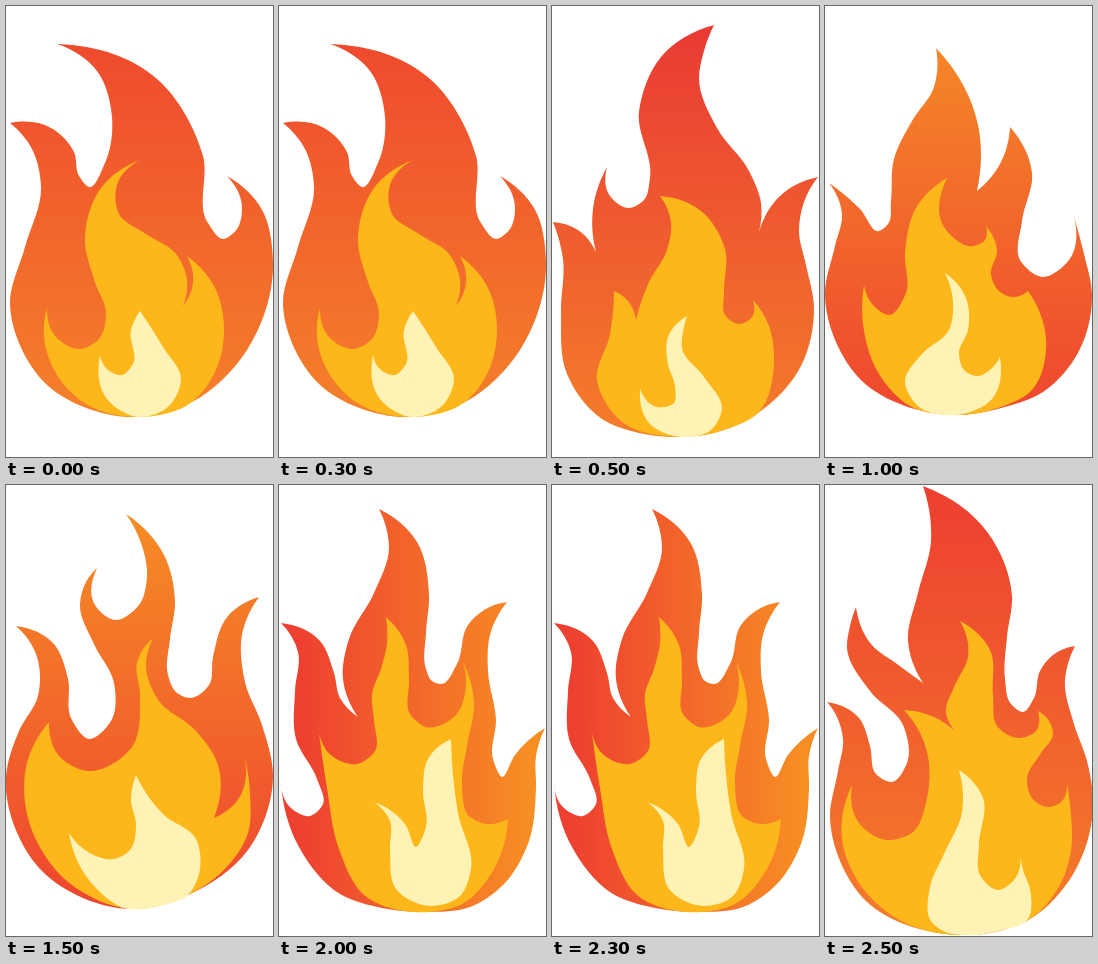
An HTML page for the animation above (3 s loop, 267 px wide and 451 px high).

```html
<!DOCTYPE html>
<html lang="en">
<head>
<meta charset="utf-8">
<title>Flame</title>
<style>
  html, body { margin: 0; width: 100%; height: 100%; overflow: hidden; background: #fff; }
  svg { display: block; width: 100%; height: 100%; }
</style>
</head>
<body>
<svg id="stage" viewBox="0 0 267 451"></svg>
<script>
const STEP = 500;
const stage = document.getElementById('stage');
const flames = [];

function add(parent, tag, attrs) {
  const el = document.createElementNS('http://www.w3.org/2000/svg', tag);
  for (const key in attrs) el.setAttribute(key, attrs[key]);
  return parent.appendChild(el);
}

// Smooth curve through points, with parabolic tangents at each one.
function curve(pts) {
  const last = pts.length - 1;
  const h = [], slope = [], tan = [];
  for (let i = 0; i < last; i++) {
    const dx = pts[i + 1][0] - pts[i][0], dy = pts[i + 1][1] - pts[i][1];
    h[i] = Math.hypot(dx, dy);
    slope[i] = [dx / h[i], dy / h[i]];
  }
  for (let i = 1; i < last; i++) {
    tan[i] = [0, 1].map(k =>
      (h[i] * slope[i - 1][k] + h[i - 1] * slope[i][k]) / (h[i - 1] + h[i]));
  }
  tan[0] = [0, 1].map(k => 2 * slope[0][k] - tan[1][k]);
  tan[last] = [0, 1].map(k => 2 * slope[last - 1][k] - tan[last - 1][k]);
  let d = '';
  for (let i = 0; i < last; i++) {
    const a = pts[i].map((v, k) => v + tan[i][k] * h[i] / 3);
    const b = pts[i + 1].map((v, k) => v - tan[i + 1][k] * h[i] / 3);
    d += `C${a} ${b} ${pts[i + 1]}`;
  }
  return d;
}

// Slashes split an outline into smooth runs; each run starts at a sharp tip.
function outline(text) {
  const runs = text.split('/').map(run =>
    run.trim().split(/\s+/).map(p => p.split(',').map(Number)));
  return 'M' + runs[0][0] +
    runs.map((run, i) => curve([...run, runs[(i + 1) % runs.length][0]])).join('') + 'Z';
}

function layer(fill, text) {
  add(flames[flames.length - 1], 'path', { d: outline(text), fill });
}

// The outer layer opens a new pose; its gradient runs along one axis.
function outer(from, to, axis, start, end, text) {
  const id = 'heat' + flames.length;
  const group = add(stage, 'g', { visibility: flames.length ? 'hidden' : 'visible' });
  const ends = axis === 'x' ? { x1: start, x2: end, y1: 0, y2: 0 }
                            : { x1: 0, x2: 0, y1: start, y2: end };
  const fade = add(group, 'linearGradient', { id, gradientUnits: 'userSpaceOnUse', ...ends });
  add(fade, 'stop', { offset: 0, 'stop-color': from });
  add(fade, 'stop', { offset: 1, 'stop-color': to });
  flames.push(group);
  layer(`url(#${id})`, text);
}
const middle = text => layer('#fdb71a', text);
const inner = text => layer('#fff2b5', text);

// Leaning left, two hooks
outer('#ef4a2e', '#f4812a', 'y', 38, 411, `
  51,38 151,73 197,150 202,217 217,233 231,223 236,203
  / 221,170 255,202 267,256 241,344 186,396 130,411 39,377 4,296 19,241 35,180 26,143
  / 4,117 45,122 68,146 73,170 83,181 99,157 106,111 91,65`);
middle(`
  134,154 95,182 79,235 89,276 100,307 93,333 74,343 50,331
  / 41,302 38,330 47,362 80,398 132,411 186,396 209,366 218,325 208,280
  / 181,250 187,277 / 177,300 181,274 170,248 140,228 113,208 111,179`);
inner(`
  134,305 125,324 127,358 116,369 102,364
  / 94,349 101,393 133,411 163,400 175,373 157,341`);

// Tall tip curling right
outer('#e93a34', '#f47d2a', 'y', 19, 431, `
  162,19 109,51 87,106 98,172 92,194 77,202 58,190
  / 55,161 41,203 / 44,246 26,224
  / 1,216 11,253 9,305 15,368 50,413 87,427 130,431 172,424 206,407 249,360 262,302
  254,259 247,225 252,196 / 266,171 228,190 / 207,226 209,197 197,165 165,122 147,72 152,45`);
middle(`
  108,190 119,216 115,244 97,276 / 84,314 76,295
  / 62,285 58,328 45,374 69,415 130,431 172,424 206,407 222,351 217,320
  / 201,294 200,311 187,318 173,309 172,287 173,243 149,205`);
inner(`
  135,310 116,331 116,358 123,380 122,397 105,401
  / 88,383 97,417 130,431 159,424 170,403 152,371 130,342 131,326`);

// Centre tip with a shoulder on the right
outer('#f58628', '#ee462f', 'y', 42, 409, `
  111,42 109,81 87,115 69,153 66,195 63,218 54,225 35,203
  / 4,177 17,208 10,240 0,287 36,374 130,409 176,402 218,386 254,345 267,288 259,248
  / 249,211 244,254 217,271 195,254 197,215 207,167 / 185,121 176,156 / 152,185 153,119`);
middle(`
  122,172 91,202 80,247 81,287 64,309 48,299
  / 39,279 39,325 54,368 85,400 130,409 173,402 207,384 221,333 215,307
  / 203,285 188,291 174,285 166,269 172,244 / 161,220 160,234 149,240 119,221`);
inner(`
  120,267 141,292 143,324 134,347 140,365 153,370 166,363
  / 175,351 167,393 130,409 93,400 80,375 97,348 124,324 128,296`);

// Open claws on both sides
outer('#f68c25', '#ee4530', 'y', 29, 424, `
  120,29 158,70 169,117 164,154 162,190 170,207 184,213 203,200 207,172 222,131
  / 253,112 237,145 239,197 256,240 267,290 242,365 182,410 127,424 36,386 0,291
  13,246 32,211 30,169 / 10,141 47,158 62,194 65,233 83,254 105,236 108,198 88,159 74,119 80,97
  / 91,83 89,120 109,135 133,120 141,91 135,58`);
middle(`
  147,153 131,178 134,209 126,262 82,286 54,272
  / 43,237 21,278 21,329 61,396 127,424 182,410 218,385 242,348 244,308
  / 238,269 233,313 / 208,333 212,280 188,244 153,216 140,179 142,166`);
inner(`
  130,290 125,315 130,340 124,365 108,374 82,367
  / 63,348 83,395 122,424 153,421 182,410 194,384 190,354 157,329`);

// Heat running from left to right
outer('#ee4030', '#f78e24', 'x', 20, 250, `
  100,24 138,57 150,110 147,148 147,184 153,196 162,199 178,179 189,140 205,125
  / 228,117 211,150 209,186 217,235 214,274 223,292 236,270
  / 266,243 257,271 257,303 250,356 224,400 191,422 151,427 103,423 61,409 20,362
  / 2,297 12,323 31,331 44,319 38,294 17,254 16,206 19,167 / 2,138 41,156 55,188 61,213
  / 79,232 64,194 70,154 95,108 110,62 107,42`);
middle(`
  107,132 127,160 130,195 131,229 147,242 177,230 187,200
  / 184,177 195,216 188,261 183,298 191,332 208,339
  / 229,334 215,384 183,419 151,427 84,409 60,364 48,303
  / 39,238 53,271 78,279 96,266 95,235 93,209 102,184 108,158`);
inner(`
  172,254 149,274 144,305 147,342 137,362 126,339
  / 95,317 111,336 111,364 117,404 151,421 181,411 192,384 179,328`);

// Highest reach
outer('#ed3f31', '#f47e2a', 'y', 1, 450, `
  98,1 163,48 187,111 182,152 180,194 186,219 198,227 209,213 215,186 228,170
  / 250,161 240,195 249,239 262,276 268,324 247,391 205,434 170,447 133,450 41,416 5,332
  13,286 18,254 11,230 / 2,217 34,233 45,261 51,289 67,297 82,278 78,240 45,206 22,163 25,141
  / 31,122 46,159 72,179 / 98,198 83,156 93,108 106,56`);
middle(`
  135,136 143,172 130,200 121,228 / 133,249 109,232
  / 79,225 101,263 102,313 88,347 61,355 34,338
  / 27,300 17,354 34,398 78,437 135,450 172,446 205,434 232,405 246,366 246,330
  / 242,299 236,317 223,322 207,313 202,294 216,268 228,249 224,236
  / 213,226 211,246 195,253 172,241 168,211 165,165`);
inner(`
  134,285 137,327 119,369 105,402 106,436 118,446 138,450 173,446 203,434 205,404 198,385
  / 195,367 189,395 173,405 155,390 154,360 158,313`);

let shown = 0;
const begin = performance.now();

function tick() {
  const next = Math.floor((performance.now() - begin) / STEP) % flames.length;
  if (next !== shown) {
    flames[shown].setAttribute('visibility', 'hidden');
    flames[next].setAttribute('visibility', 'visible');
    shown = next;
  }
  requestAnimationFrame(tick);
}
requestAnimationFrame(tick);
</script>
</body>
</html>
```
